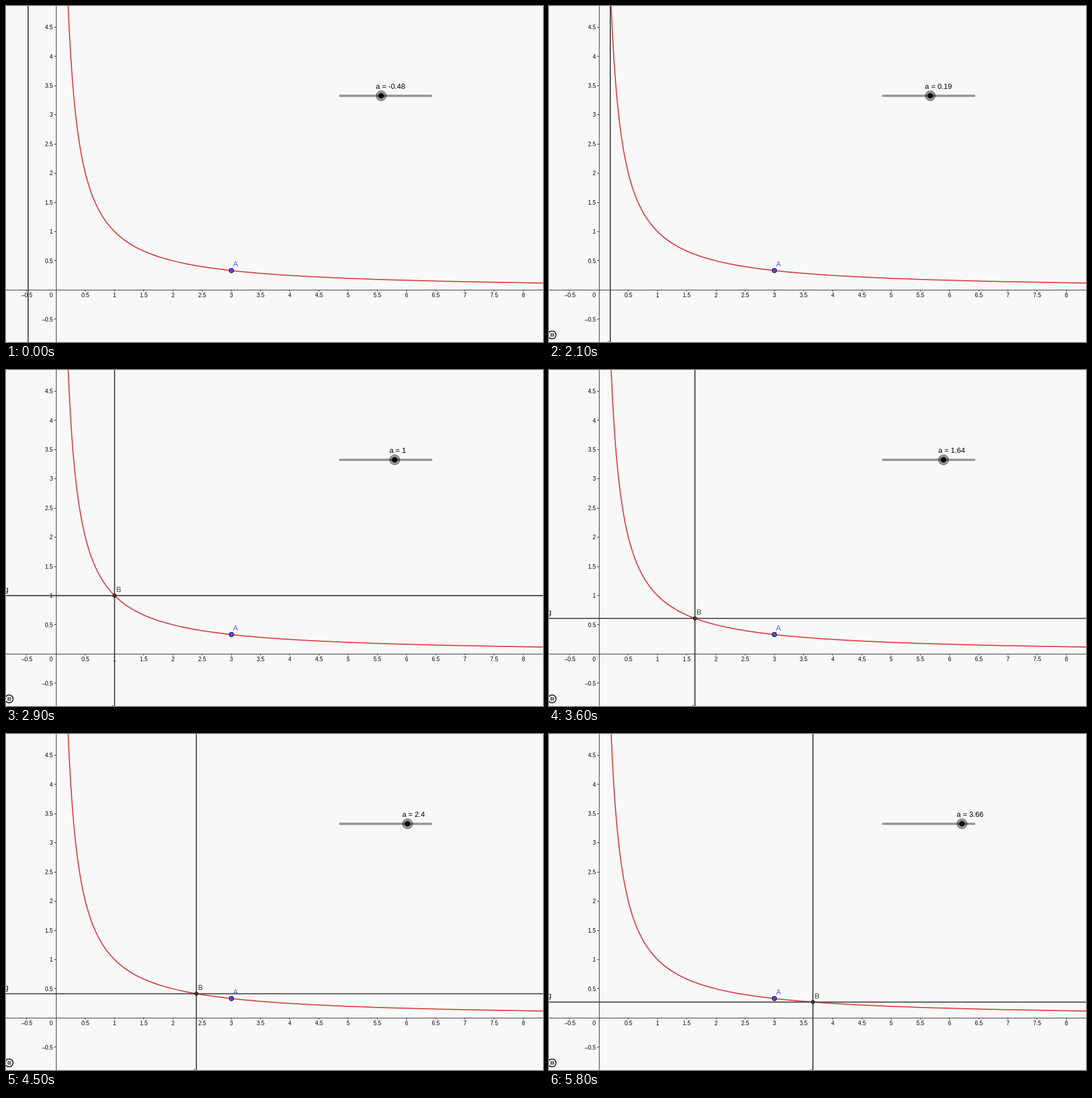
Write an HTML page that moves like this. It is 946 px wide and 592 px high and loops after 5.9 s.

```html
<!DOCTYPE html>
<html lang="en">
<head>
<meta charset="utf-8">
<title>Hyperbola with slider</title>
<style>
  html, body { margin: 0; width: 100%; height: 100%; overflow: hidden; background: #f8f8f8; }
  svg { display: block; width: 946px; height: 592px; }
  text { font: 13px "Liberation Sans", Arial, sans-serif; white-space: pre; }
  #axes text { font-size: 10px; }
  #axes path { stroke: #2b2b2b; fill: none; }
  .line { stroke: #363636; stroke-width: 1.8; }
  .dark { fill: #444; }
  .blue { fill: #4d4dff; }
</style>
</head>
<body>
<svg viewBox="0 0 946 592">
  <g id="axes"></g>
  <path id="curve" fill="none" stroke="#db4848" stroke-width="2"/>

  <path d="M588.5 158.2H749" stroke="#969696" stroke-width="4" stroke-linecap="round"/>
  <g id="knob">
    <circle cy="158.2" r="9" fill="#000" fill-opacity=".4" stroke="#000" stroke-opacity=".4"/>
    <circle cy="158.2" r="4.8"/>
    <text id="value" x="-9.3" y="146"></text>
  </g>

  <g id="vert">
    <path class="line" d="M0 0V592"/>
    <text id="vertName" x="-6" y="600">f</text>
  </g>
  <g id="horiz">
    <path class="line" d="M0 0H946"/>
    <text x="-3" y="-7">g</text>
  </g>
  <g id="cross">
    <circle r="3" fill="#444" stroke="#000"/>
    <text class="dark" x="3" y="-6.5">B</text>
  </g>

  <g id="fixed">
    <circle class="blue" r="4" stroke="#000"/>
    <text class="blue" x="2.9" y="-7.3">A</text>
  </g>

  <g id="pause" fill="none" stroke="#000" stroke-width="1.5">
    <circle cx="5.5" cy="579.5" r="7"/>
    <path d="M3.8 576.3V582.7M7.2 576.3V582.7"/>
  </g>
</svg>
<script>
const $ = id => document.getElementById(id);
const UNIT = 102.88, LOOP = 5900, STEP = 100;
const px = x => 88.4 + UNIT * x;
const py = y => 500.4 - UNIT * y;
const move = (id, x, y) => $(id).setAttribute("transform", `translate(${x} ${y})`);
const show = (id, on) => { $(id).style.display = on ? "" : "none"; };

function drawAxes() {
  let d = "M0 500.5H946M88.5 0V592", labels = "";
  const label = (x, y, anchor, v) => {
    labels += `<text x="${x}" y="${y}" text-anchor="${anchor}">${String(v).replace("-", "–")}</text>`;
  };
  for (let v = -0.5; v <= 8; v += 0.5) {
    if (!v) continue;
    d += `M${Math.floor(px(v)) + 0.5} 500V503`;
    label(px(v), 513.3, "middle", v);
  }
  for (let v = -0.5; v <= 4.5; v += 0.5) {
    if (!v) continue;
    d += `M85 ${Math.floor(py(v)) + 0.5}H88`;
    label(82.6, py(v) + 3.7, "end", v);
  }
  label(82.2, 513.3, "end", 0);
  $("axes").innerHTML = `<path d="${d}"/>${labels}`;
}

function drawCurve() {
  const points = [];
  for (let x = 0.19; x < 8.4; x *= 1.015) points.push(`${px(x).toFixed(2)} ${py(1 / x).toFixed(2)}`);
  points.push(`${px(8.5)} ${py(1 / 8.5)}`);
  $("curve").setAttribute("d", "M" + points.join("L"));
}

// Slider value at chosen times; even speed in between
const keys = [[1300, -0.48], [2100, 0.19], [2900, 1], [3600, 1.64], [4100, 2], [5000, 2.89], [5800, 3.66]];

function valueAt(t) {
  if (t <= keys[0][0]) return keys[0][1];
  const i = keys.findIndex(k => t <= k[0]);
  const [t0, a0] = keys[i - 1], [t1, a1] = keys[i];
  return Math.round((a0 + (a1 - a0) * (t - t0) / (t1 - t0)) * 100) / 100;
}

function render(now) {
  const t = Math.floor(now % LOOP / STEP) * STEP;
  const a = valueAt(t), playing = t >= 1400, meets = a > 0.15;
  $("value").textContent = "a = " + a;
  move("knob", 668.6 + 16.1 * a, 0);
  move("vert", px(a), 0);
  show("vertName", playing);
  show("pause", playing);
  show("horiz", meets);
  show("cross", meets);
  if (meets) {
    move("horiz", 0, py(1 / a));
    move("cross", px(a), py(1 / a));
  }
}

function tick() {
  render(performance.now());
  requestAnimationFrame(tick);
}

drawAxes();
drawCurve();
move("fixed", px(3), py(1 / 3));
tick();
</script>
</body>
</html>
```
